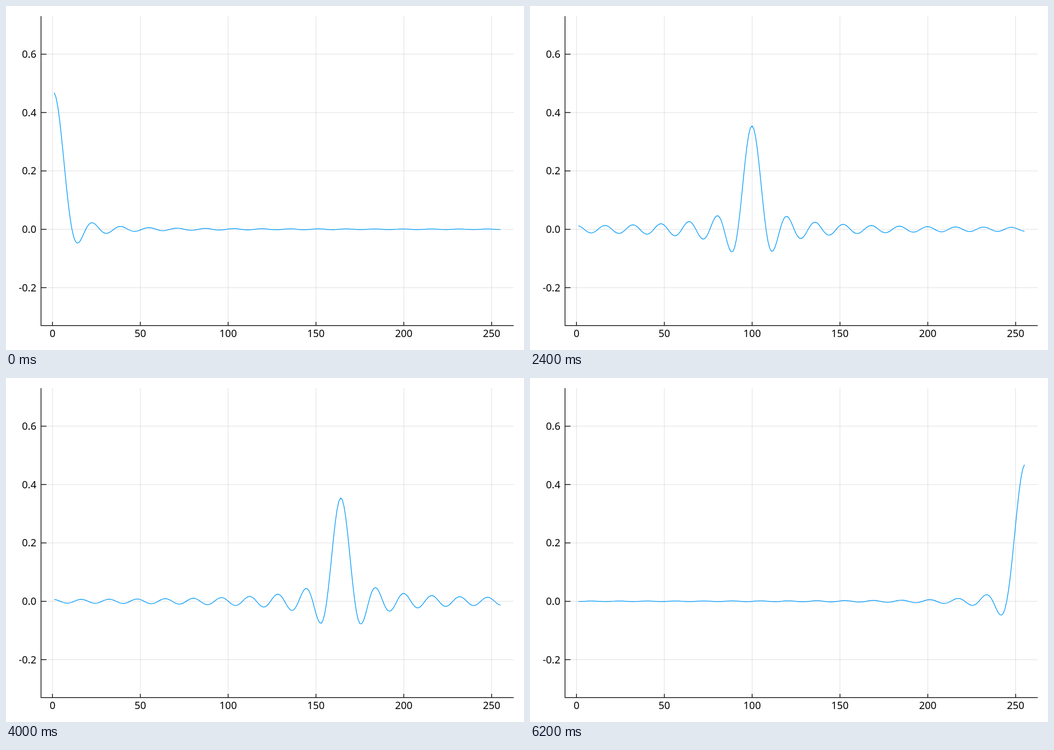
These frames come from a looping animation (917 by 611 pixels, 6400 ms). An HTML page:

```html
<!DOCTYPE html>
<html lang="en">
<head>
<meta charset="utf-8">
<title>Localized modes</title>
<style>
  html, body { margin: 0; width: 100%; height: 100%; overflow: hidden; background: #fff; }
  svg { display: block; width: 917px; height: 611px; }
  text { font: 18px "Noto Sans", "Open Sans", sans-serif; fill: #000; }
  .grid { stroke: #000; stroke-opacity: .12; stroke-width: 1; }
  .axis { stroke: #000; stroke-width: 1.25; fill: none; }
  #curve { stroke: #009afa; stroke-width: 1.25; fill: none; stroke-linejoin: round; }
</style>
</head>
<body>
<svg viewBox="0 0 917 611">
  <g id="frame"></g>
  <path id="curve"/>
</svg>
<script>
const N = 255, M = 32, STEP = 200;
const LEFT = 62, RIGHT = 898.8, TOP = 18, BOTTOM = 567.6;
const px = x => 82.3 + x * 3.1096;
const py = y => 396.6 - y * 518.4;

function drawFrame() {
  let out = '';
  const line = (cls, d) => { out += `<path class="${cls}" d="${d}"/>`; };
  const label = (x, y, anchor, s) => { out += `<text x="${x}" y="${y}" text-anchor="${anchor}">${s}</text>`; };
  for (let v = 0; v <= 250; v += 50) {
    const x = px(v);
    line('grid', `M${x} ${TOP}V${BOTTOM}`);
    line('axis', `M${x} ${BOTTOM}v-6.5`);
    label(x, 588, 'middle', v);
  }
  for (let i = -1; i <= 3; i++) {
    const y = py(i / 5);
    line('grid', `M${LEFT} ${y}H${RIGHT}`);
    line('axis', `M${LEFT} ${y}h9.7`);
    label(53.7, y + 6.4, 'end', (i / 5).toFixed(1));
  }
  line('axis', `M${LEFT} ${TOP}V${BOTTOM}H${RIGHT}`);
  document.getElementById('frame').innerHTML = out;
}

// Jacobi rotations for a symmetric matrix; eigenvectors are the columns of v.
function eigen(a) {
  const n = a.length;
  const v = a.map((_, i) => a.map((_, j) => +(i === j)));
  for (let sweep = 0; sweep < 14; sweep++) {
    for (let p = 0; p < n; p++) for (let q = p + 1; q < n; q++) {
      if (Math.abs(a[p][q]) < 1e-12) continue;
      const h = (a[q][q] - a[p][p]) / (2 * a[p][q]);
      const t = (h < 0 ? -1 : 1) / (Math.abs(h) + Math.hypot(h, 1));
      const c = 1 / Math.hypot(t, 1), s = t * c;
      const turn = (r, i, j) => {
        const x = r[i], y = r[j];
        r[i] = c * x - s * y;
        r[j] = s * x + c * y;
      };
      for (const row of a) turn(row, p, q);
      for (let k = 0; k < n; k++) {
        const x = a[p][k], y = a[q][k];
        a[p][k] = c * x - s * y;
        a[q][k] = s * x + c * y;
      }
      for (const row of v) turn(row, p, q);
    }
  }
  return { values: a.map((r, i) => r[i]), v };
}

// Eigenvectors of position restricted to the M smoothest cosine modes.
function localModes() {
  const sites = Array.from({ length: N }, (_, i) => i + 1);
  const basis = Array.from({ length: M }, (_, k) =>
    sites.map(x => Math.sqrt((k ? 2 : 1) / N) * Math.cos(k * Math.PI * (x - .5) / N)));
  const pos = basis.map(f => basis.map(g =>
    sites.reduce((sum, x, i) => sum + f[i] * g[i] * (x - 128), 0)));
  const { values, v } = eigen(pos);
  const order = values.map((_, i) => i).sort((i, j) => values[i] - values[j]);
  return order.map(m => {
    const y = sites.map((_, i) => basis.reduce((sum, f, k) => sum + f[i] * v[k][m], 0));
    const sign = Math.max(...y) > -Math.min(...y) ? 1 : -1;
    return y.map(u => u * sign);
  });
}

drawFrame();
const paths = localModes().map(mode =>
  'M' + mode.map((y, i) => `${px(i + 1).toFixed(2)} ${py(y).toFixed(2)}`).join('L'));
const curve = document.getElementById('curve');
let shown = -1;

function show(ms) {
  const i = Math.floor(ms / STEP) % M;
  if (i !== shown) curve.setAttribute('d', paths[shown = i]);
}
show(0);
const start = performance.now();
(function tick() {
  show(performance.now() - start);
  requestAnimationFrame(tick);
})();
</script>
</body>
</html>
```
